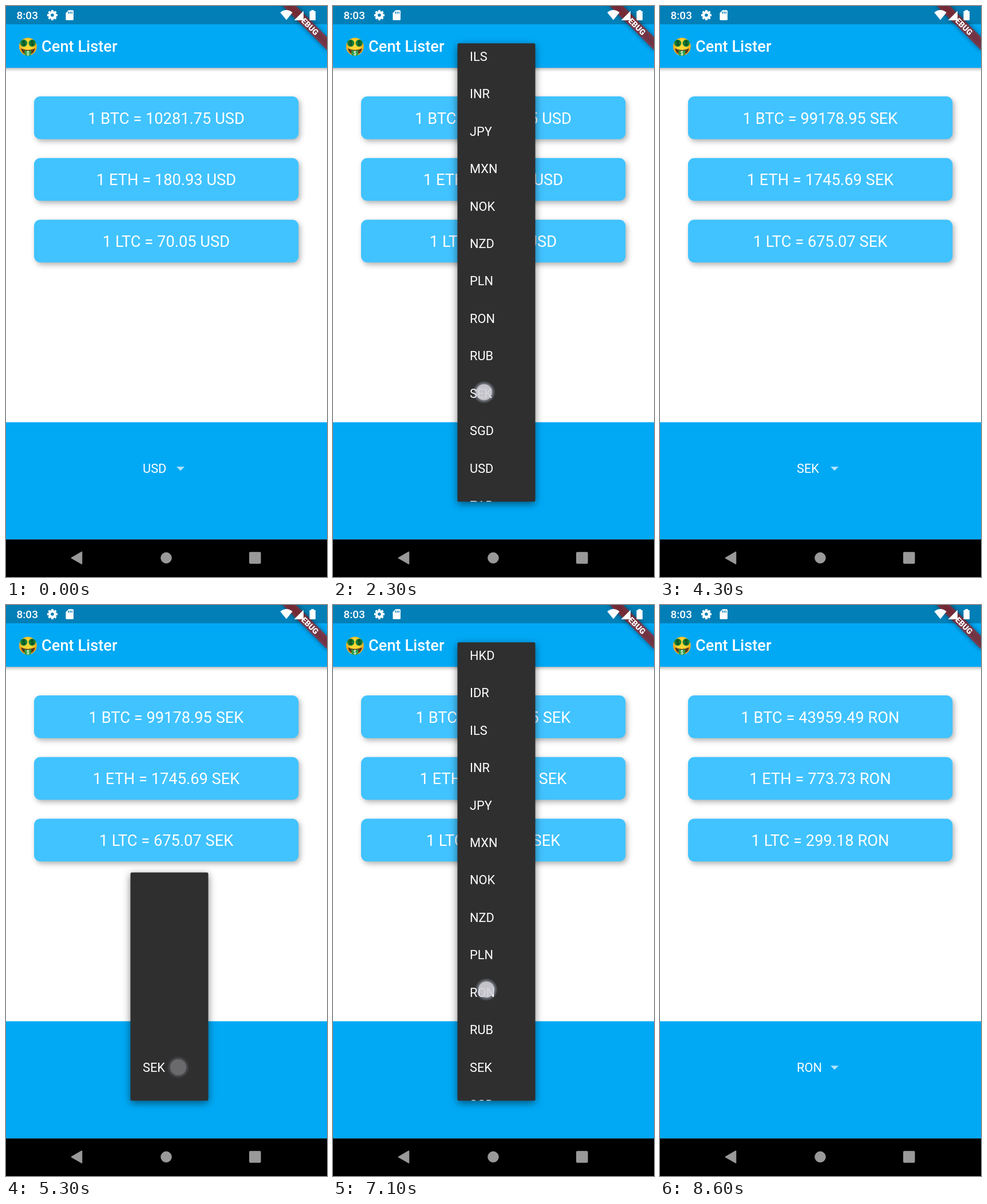
Recreate the animation shown at these times as an HTML page. Size 561x998 px, loop 9900 ms.

```html
<!DOCTYPE html>
<html lang="en">
<head>
<meta charset="utf-8">
<title>Price board</title>
<style>
  html, body { margin: 0; width: 100%; height: 100%; overflow: hidden; background: #fff; }
  svg { display: block; position: absolute; left: 0; top: 0; }
  text { font-family: Roboto, "Liberation Sans", sans-serif; fill: #fff; white-space: pre; }
  .price { font-size: 27.27px; text-anchor: middle; }
  .item { font-size: 21.8px; }
  .card { fill: #41c3ff; filter: drop-shadow(3px 4px 5px rgba(0,0,0,.3)); }
  .bar { fill: #01a9f5; filter: drop-shadow(0 2px 3px rgba(0,0,0,.35)); }
  .panel { fill: #2f2f2f; filter: drop-shadow(0 4px 7px rgba(0,0,0,.5)); }
  .ribbon { fill: #b71c1c; fill-opacity: .627; }
  .dollar { font-weight: 700; text-anchor: middle; }
</style>
</head>
<body>
<svg width="561" height="998" viewBox="0 0 561 998">
  <defs>
    <radialGradient id="halo">
      <stop offset=".6" stop-color="#dfe4f4" stop-opacity=".6"/>
      <stop offset="1" stop-color="#c4d0f0" stop-opacity="0"/>
    </radialGradient>
    <radialGradient id="skin" cy=".4">
      <stop offset=".5" stop-color="#fdd835"/>
      <stop offset="1" stop-color="#f2a91c"/>
    </radialGradient>
    <filter id="soft" x="-30%" y="-120%" width="160%" height="340%">
      <feGaussianBlur stdDeviation="4"/>
    </filter>
    <clipPath id="window"><rect id="hole" x="217.5" width="136" rx="2.5"/></clipPath>
  </defs>

  <rect width="561" height="998" fill="#fff"/>
  <rect class="bar" x="-10" y="-10" width="581" height="118"/>
  <rect width="561" height="32" fill="#027fb7"/>

  <g id="face">
    <circle cx="38.3" cy="71" r="15.4" fill="url(#skin)"/>
    <path d="M26 74 Q38 80 51 74 Q49 85 38.3 85 Q28 85 26 74Z" fill="#5d3a1f"/>
    <path d="M32.5 77 Q38 79.5 44 77 V83 Q44 87.5 38.3 87.5 Q32.5 87.5 32.5 83Z" fill="#2e9b43"/>
    <circle cx="31" cy="65" r="6.2" fill="#188038"/>
    <circle cx="45.7" cy="65" r="6.2" fill="#188038"/>
    <text class="dollar" x="31" y="68.7" font-size="10.5" style="fill:#0b3d1c">$</text>
    <text class="dollar" x="45.7" y="68.7" font-size="10.5" style="fill:#0b3d1c">$</text>
    <text class="dollar" x="38.3" y="86" font-size="9">$</text>
  </g>
  <text x="62" y="80.4" font-size="27.27" font-weight="500">Cent Lister</text>

  <g id="cards"></g>

  <rect y="727.5" width="561" height="205" fill="#01a9f5"/>
  <text id="chosen" class="item" x="239" y="815.7"></text>
  <path d="M298 805.3H312L305 812.2Z" fill="#fff" opacity=".7"/>

  <g id="menu">
    <rect id="panel" class="panel" x="217.5" width="136" rx="2.5"/>
    <g id="list" clip-path="url(#window)"></g>
  </g>

  <g transform="translate(561 0) rotate(45)">
    <rect x="-56" y="38.2" width="112" height="16.4" filter="url(#soft)" opacity=".5"/>
    <rect class="ribbon" x="-60" y="38.2" width="120" height="16.4"/>
    <text x="0" y="51.3" font-size="13.9" font-weight="900" text-anchor="middle">DEBUG</text>
  </g>

  <g fill="#fff">
    <text x="18.5" y="23" font-size="19" font-weight="500">8:03</text>
    <g id="gear" transform="translate(81 16)">
      <circle r="4.9" fill="none" stroke="#fff" stroke-width="4.2"/>
    </g>
    <path d="M109.5 7.2H116.5Q118 7.2 118 8.7V23.3Q118 24.8 116.5 24.8H106Q104.5 24.8 104.5 23.3V12.2Z"/>
    <path d="M109.3 9.7v3.8M112.3 9.7v3.8M115.3 9.7v3.8" stroke="#027fb7" stroke-width="1.5"/>
    <path d="M490 24.5L479.3 11.3Q490 2.8 500.7 11.3Z"/>
    <path d="M503.5 25L520 8.5V25Z"/>
    <path d="M533.5 7H538V8.8H540Q541 8.8 541 9.8V24Q541 25 540 25H531.5Q530.5 25 530.5 24V9.8Q530.5 8.8 531.5 8.8H533.5Z"/>
  </g>

  <rect y="932.3" width="561" height="66" fill="#000"/>
  <g fill="#999" stroke="#999" stroke-linejoin="round">
    <path d="M114.5 964.7L132.5 954.3V975Z" stroke-width="1.6"/>
    <circle cx="280" cy="964.6" r="9.3"/>
    <rect x="425.5" y="954.8" width="19.5" height="19.5" rx="1"/>
  </g>

  <g id="touch">
    <circle r="20" fill="url(#halo)"/>
    <circle r="14" fill="#cfced3" fill-opacity=".78"/>
  </g>
</svg>
<script>
const LOOP = 9900, STEP = 100;
const ROW = 65.45, TOP = 65.3, BOTTOM = 866.3, ROW_Y = 815.7;
const CODES = "AUD BRL CAD CNY EUR GBP HKD IDR ILS INR JPY MXN NOK NZD PLN RON RUB SEK SGD USD ZAR".split(" ");
const COINS = ["BTC", "ETH", "LTC"];

const quotes = [
  { at: 0, code: "USD", values: ["10281.75", "180.93", "70.05"] },
  { at: 2400, code: "SEK", values: ["?", "?", "?"] },
  { at: 4300, code: "SEK", values: ["99178.95", "1745.69", "675.07"] },
  { at: 7300, code: "RON", values: ["?", "?", "?"] },
  { at: 8600, code: "RON", values: ["43959.49", "773.73", "299.18"] }
];
const menus = [
  { open: 701, close: 2310, code: "USD" },
  { open: 5191, close: 7210, code: "SEK" }
];
const taps = [
  { down: 600, up: 690, x: 303, y: 808 },
  { down: 2300, up: 2300, x: 264, y: 675 },
  { down: 5100, up: 5180, x: 301, y: 808 },
  { down: 7100, up: 7200, x: 268, y: 672 }
];

const $ = id => document.getElementById(id);
const clamp = v => Math.min(1, Math.max(0, v));
const ramp = (v, from, to) => clamp((v - from) / (to - from));

function add(parent, tag, attrs) {
  const el = document.createElementNS("http://www.w3.org/2000/svg", tag);
  for (const key in attrs) el.setAttribute(key, attrs[key]);
  return parent.appendChild(el);
}

for (let i = 0; i < 8; i++)
  add($("gear"), "rect", { x: -1.9, y: -9, width: 3.8, height: 4, rx: .6, transform: `rotate(${i * 45})` });

const prices = COINS.map((coin, i) => {
  const y = 158 + i * 107.75;
  add($("cards"), "rect", { class: "card", x: 49, y, width: 462.3, height: 74.7, rx: 11 });
  return add($("cards"), "text", { class: "price", x: 280, y: y + 47.7 });
});

const items = CODES.map(code => {
  const el = add($("list"), "text", { class: "item", x: 239 });
  el.textContent = code;
  return el;
});

function drawMenu(t) {
  const menu = menus.find(m => t >= m.open && t < m.close + 75);
  $("menu").style.display = menu ? "" : "none";
  if (!menu) return;

  const p = ramp(t, menu.open, menu.open + 300);
  const fade = ramp(p, 0, .25) * (1 - ramp(t, menu.close, menu.close + 75));
  const top = BOTTOM - ROW + (TOP - BOTTOM + ROW) * ramp(p, .25, .5);
  $("menu").setAttribute("opacity", fade);
  for (const id of ["panel", "hole"]) {
    $(id).setAttribute("y", top);
    $(id).setAttribute("height", BOTTOM - top);
  }

  // Rows fade in one after another; the selected row is there from the start.
  const selected = CODES.indexOf(menu.code);
  const unit = .5 / (CODES.length + 1.5);
  items.forEach((el, i) => {
    const start = .5 + (i + 1) * unit;
    el.setAttribute("y", ROW_Y + (i - selected) * ROW);
    el.setAttribute("opacity", i === selected ? 1 : ramp(p, start, start + 1.5 * unit));
  });
}

function drawTouch(t) {
  const tap = taps.find(s => t >= s.down && t < s.up + 200);
  $("touch").style.display = tap ? "" : "none";
  if (!tap) return;
  $("touch").setAttribute("transform", `translate(${tap.x} ${tap.y})`);
  $("touch").setAttribute("opacity", 1 - ramp(t, tap.up, tap.up + 200));
}

function draw(t) {
  const quote = quotes.filter(q => q.at <= t).pop();
  prices.forEach((el, i) => {
    el.textContent = `1 ${COINS[i]} = ${quote.values[i]} ${quote.code}`;
  });
  $("chosen").textContent = quote.code;
  drawMenu(t);
  drawTouch(t);
}

const began = performance.now();
function tick() {
  const t = (performance.now() - began) % LOOP;
  draw(Math.floor(t / STEP) * STEP);
  requestAnimationFrame(tick);
}
tick();
</script>
</body>
</html>
```
